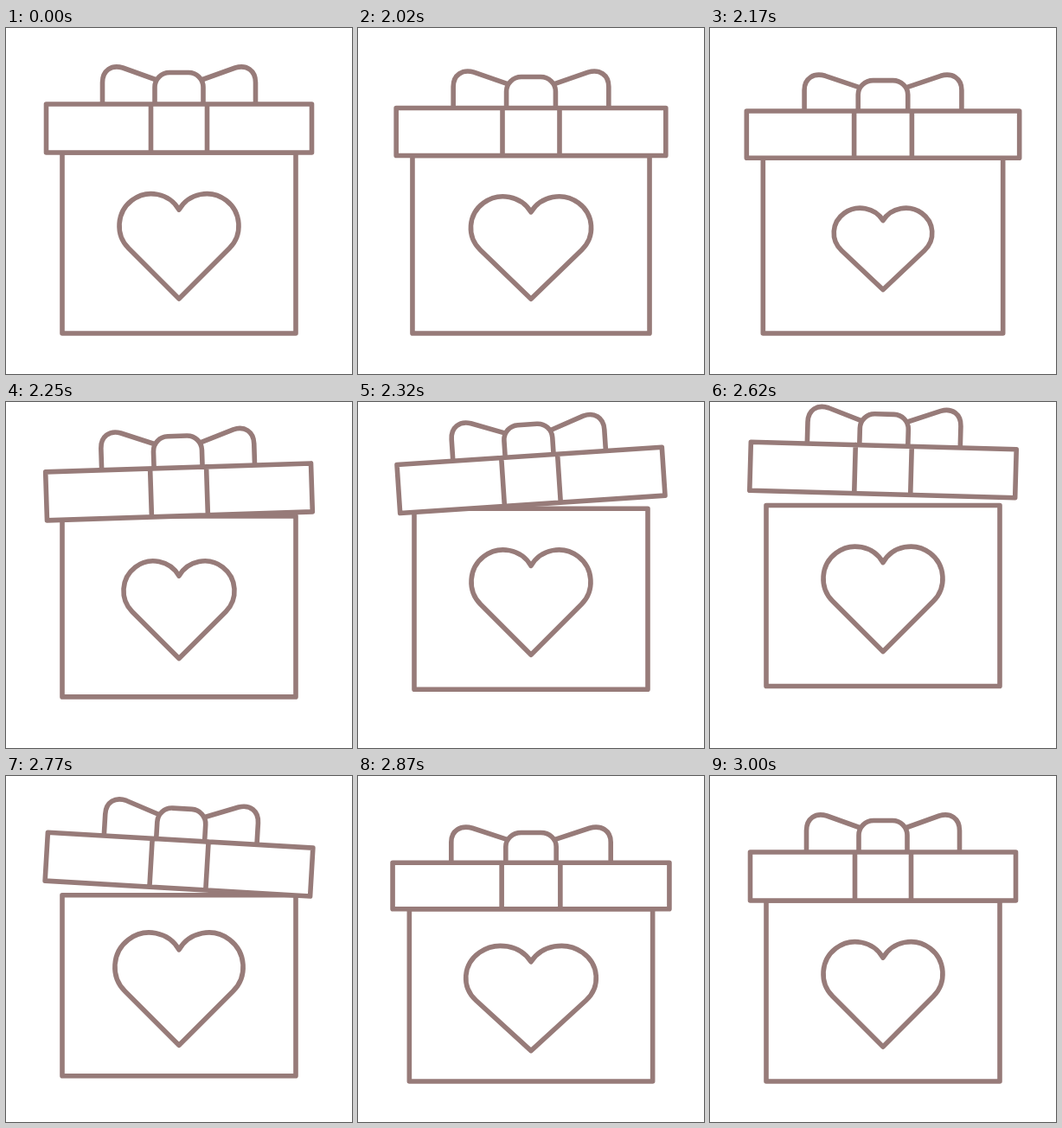
An HTML page for the animation above (3.02 s loop, 400 by 400 pixels).

```html
<!DOCTYPE html>
<html>
<head>
<meta charset="utf-8">
<style>
  html, body { margin: 0; height: 100%; overflow: hidden; background: #fff; }
  svg { display: block; width: 100vw; height: 100vh; }
  path { vector-effect: non-scaling-stroke; }
</style>
</head>
<body>
<svg viewBox="0 0 400 400" fill="#fff" stroke="#977b79" stroke-width="5.6" stroke-linejoin="round" stroke-linecap="round">
  <g id="gift">
    <path d="M65 144H335V353H65Z"/>
    <path id="heart" d="M200 313L141.8 254.8A37 37 0 1 1 200 210.1A37 37 0 1 1 258.2 254.8Z"/>
    <g id="lid">
      <path d="M111.5 88V63C111.5 49 122 42 135 46L174 60M288.5 88V63C288.5 49 278 42 265 46L226 60"/>
      <path d="M172 88V68.5A17 17 0 0 1 189 51.5H211A17 17 0 0 1 228 68.5V88"/>
      <path d="M46.5 88H353.5V144H46.5ZM167.5 88V144M232.5 88V144"/>
    </g>
  </g>
</svg>
<script>
const LOOP = 3020, START = 2020, END = 3000;
const [gift, heart, lid] = ['gift', 'heart', 'lid'].map(id => document.getElementById(id));

// Parabolic bump: 1 at mid, 0 beyond mid ± half
const hump = (t, mid, half) => Math.max(0, 1 - ((t - mid) / half) ** 2);
const linear = u => u;
const smooth = u => (1 - Math.cos(Math.PI * u)) / 2;

function keyed(t, keys, ease) {
  const i = keys.findIndex(k => k[0] > t);
  if (i < 1) return keys[i < 0 ? keys.length - 1 : 0][1];
  const [t0, a] = keys[i - 1], [t1, b] = keys[i];
  return a + (b - a) * ease((t - t0) / (t1 - t0));
}

const TILT = [[2200, 0], [2310, -4], [2760, 4.1], [2820, 0]];
const BEAT = [[2000, 1], [2180, .8], [2300, 1], [2650, 1], [2780, 1.075], [3000, 1]];

function draw(now) {
  let t = now % LOOP;
  if (t < START || t >= END) t = 0;
  const squash = hump(t, 2105, 102) + hump(t, 2903, 97);
  const jump = 29.5 * hump(t, 2492, 314);
  const lift = Math.max(0, 42.3 * hump(t, 2516, 311) - jump);
  const beat = keyed(t, BEAT, smooth);

  gift.setAttribute('transform',
    `translate(200 ${353 - jump}) scale(${1 + .047 * squash} ${1 - .052 * squash}) translate(-200 -353)`);
  heart.setAttribute('transform', `translate(200 252) scale(${beat}) translate(-200 -252)`);
  lid.setAttribute('transform', `translate(0 ${-lift}) rotate(${keyed(t, TILT, linear)} 200 116)`);
}

const begin = performance.now();
function tick() {
  draw(performance.now() - begin);
  requestAnimationFrame(tick);
}
tick();
</script>
</body>
</html>
```
